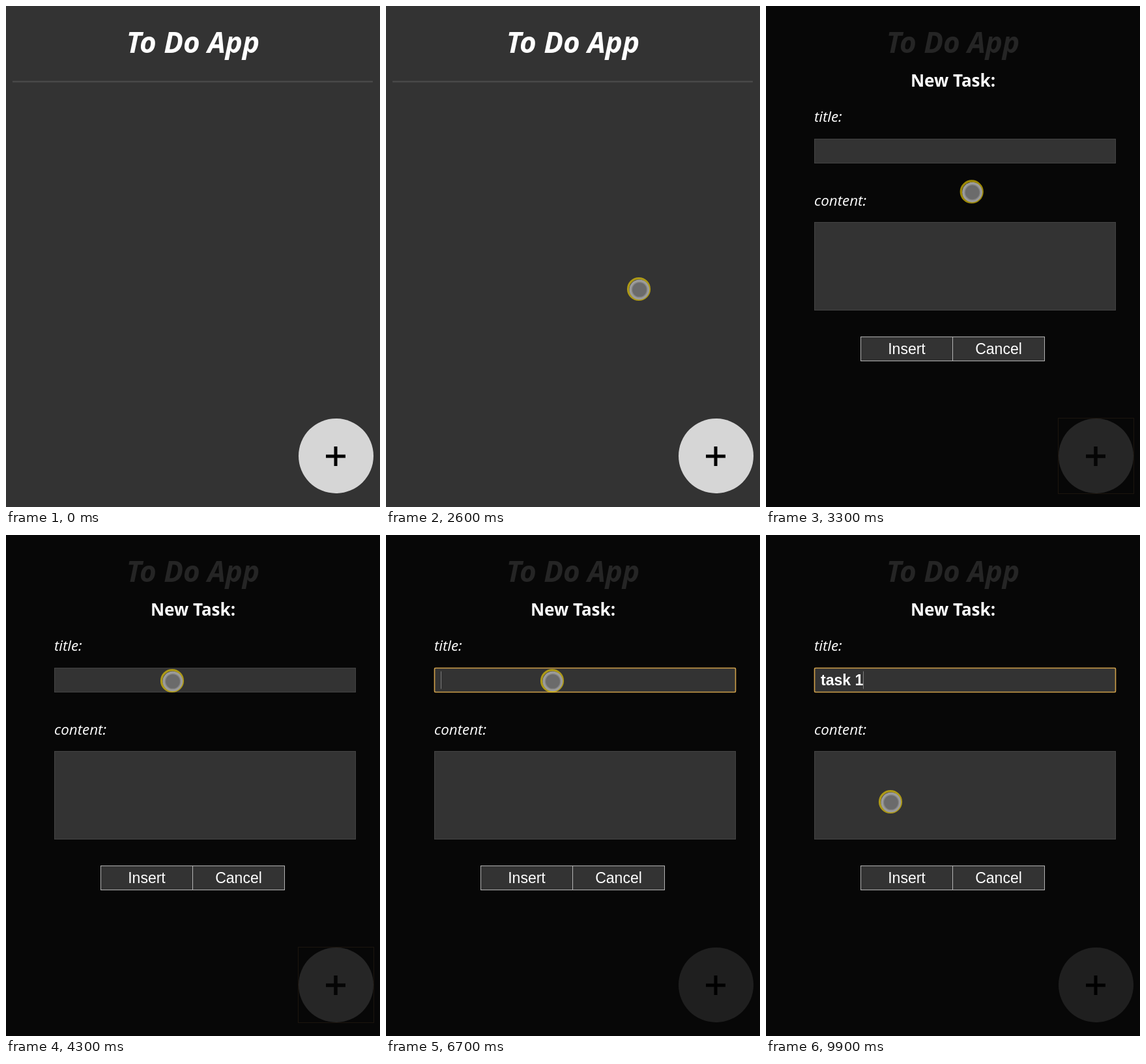
An HTML page that plays this animation: 574x770 px, repeating every 10 s.

```html
<!DOCTYPE html>
<html lang="en">
<head>
<meta charset="utf-8">
<title>To Do App</title>
<style>
  html, body { margin: 0; width: 574px; height: 770px; overflow: hidden; background: #333; }
  svg { display: block; }
  text { fill: #fff; font-family: "Open Sans", "Noto Sans", sans-serif; white-space: pre; }
  .mid { text-anchor: middle; }
  .label { font-size: 22.5px; font-style: italic; }
  .ui { font-family: "Liberation Sans", Arial, sans-serif; font-size: 23px; }
  .field { fill: #333; stroke: #434343; }
  .button { fill: #333; stroke: #b4b4b4; }
</style>
</head>
<body>
<svg width="574" height="770" viewBox="0 0 574 770">
  <text class="mid" x="287" y="71.5" font-size="44" font-weight="700" font-style="italic">To Do App</text>
  <path id="rule" d="M10 116.2H563" stroke="#484848" stroke-width="2.4"/>
  <circle cx="506.5" cy="691.5" r="57.5" fill="#d6d6d6"/>
  <path d="M491 692h30M506 677v30" stroke="#000" stroke-width="5"/>

  <g id="modal">
    <rect width="574" height="770" opacity=".855"/>
    <g id="glow">
      <circle cx="506.5" cy="691.5" r="57.5" fill="#fff" opacity=".03"/>
      <path d="M491 692h30M506 677v30" stroke="#050505" stroke-width="5"/>
      <rect x="448.5" y="633.5" width="116" height="116" fill="none" stroke="#1c150e"/>
    </g>
    <g id="flash">
      <rect x="448" y="633" width="117" height="117" rx="2" fill="#2b4966"/>
      <path d="M491 692h30M506 677v30" stroke="#3d5367" stroke-width="4"/>
    </g>
    <text class="mid" x="287" y="124" font-size="26" font-weight="700">New Task:</text>
    <text class="label" x="74" y="178">title:</text>
    <rect class="field" x="74.5" y="204.5" width="462" height="37"/>
    <rect id="focus" x="74.5" y="204.5" width="462" height="37" rx="1.5" fill="none" stroke="#cfa04a" stroke-width="1.6"/>
    <text id="typed" class="ui" x="84" y="231" font-weight="700"></text>
    <rect id="caret" y="209.5" width="1" height="27" fill="#fff"/>
    <text class="label" x="74" y="307">content:</text>
    <rect class="field" x="74.5" y="332.5" width="462" height="135"/>
    <rect class="button" x="145.5" y="508.5" width="141" height="37"/>
    <rect class="button" x="286.5" y="508.5" width="141" height="37"/>
    <text class="ui mid" x="216" y="535">Insert</text>
    <text class="ui mid" x="357" y="535">Cancel</text>
  </g>

  <g id="pointer">
    <circle r="16.4" fill="none" stroke="#ffde06" stroke-opacity=".6" stroke-width="3.4"/>
    <circle cx=".8" cy=".8" r="15.4" fill="#9c9c9c"/>
    <circle cx="1" cy="1" r="11.6" fill="#6b6b6b" stroke="#858585" stroke-width="1.5"/>
  </g>
</svg>
<script>
const $ = id => document.getElementById(id);
const LOOP = 10000, STEP = 100, OPEN = 2700, FOCUS = 5200;

// time, x, y
const path = [
  [100, 580, 686], [500, 478, 590], [800, 478, 590], [1200, 488, 633],
  [1300, 500, 670], [1500, 478, 672], [1800, 478, 672], [2000, 478, 680],
  [2400, 478, 676], [2500, 462, 638], [2600, 388, 435], [2700, 368, 376],
  [3000, 340, 310], [3100, 340, 310], [3800, 255, 224], [9300, 255, 224],
  [9700, 191, 410]
];
const word = "task 1";
const keyTimes = [7700, 8600, 8800, 9000, 9200, 9400];

function pointerAt(t) {
  const i = path.findIndex(p => p[0] > t);
  if (i < 0) return path.at(-1).slice(1);
  const [a, b] = [path[i - 1], path[i]];
  const k = (t - a[0]) / (b[0] - a[0]);
  return [1, 2].map(n => a[n] + (b[n] - a[n]) * k);
}

// The caret restarts its blink at each key press and fades briefly at each change.
function caretAlpha(t, start) {
  const age = t - start, phase = age % 1000;
  if (phase === 500) return .35;
  if (phase === 0 && age > 0) return .65;
  return phase < 500 ? 1 : 0;
}

const show = (id, on) => $(id).setAttribute("visibility", on ? "inherit" : "hidden");

function draw(t) {
  show("modal", t >= OPEN);
  show("rule", t < OPEN);
  show("glow", t >= OPEN && t < FOCUS);
  $("flash").setAttribute("opacity", Math.max(0, 1 - (t - OPEN) / 300));

  const focused = t >= FOCUS;
  show("focus", focused);
  show("caret", focused);
  const pressed = keyTimes.filter(k => k <= t);
  $("typed").textContent = word.slice(0, pressed.length);
  if (focused) {
    const width = pressed.length ? $("typed").getComputedTextLength() : 0;
    $("caret").setAttribute("x", Math.round(84 + width));
    $("caret").setAttribute("opacity", caretAlpha(t, pressed.at(-1) ?? FOCUS));
  }

  const moving = t >= path[0][0];
  show("pointer", moving);
  if (moving) $("pointer").setAttribute("transform", `translate(${pointerAt(t)})`);
}

const origin = performance.now();
function tick() {
  const t = (performance.now() - origin) % LOOP;
  draw(Math.floor(t / STEP) * STEP);
  requestAnimationFrame(tick);
}
tick();
</script>
</body>
</html>
```
